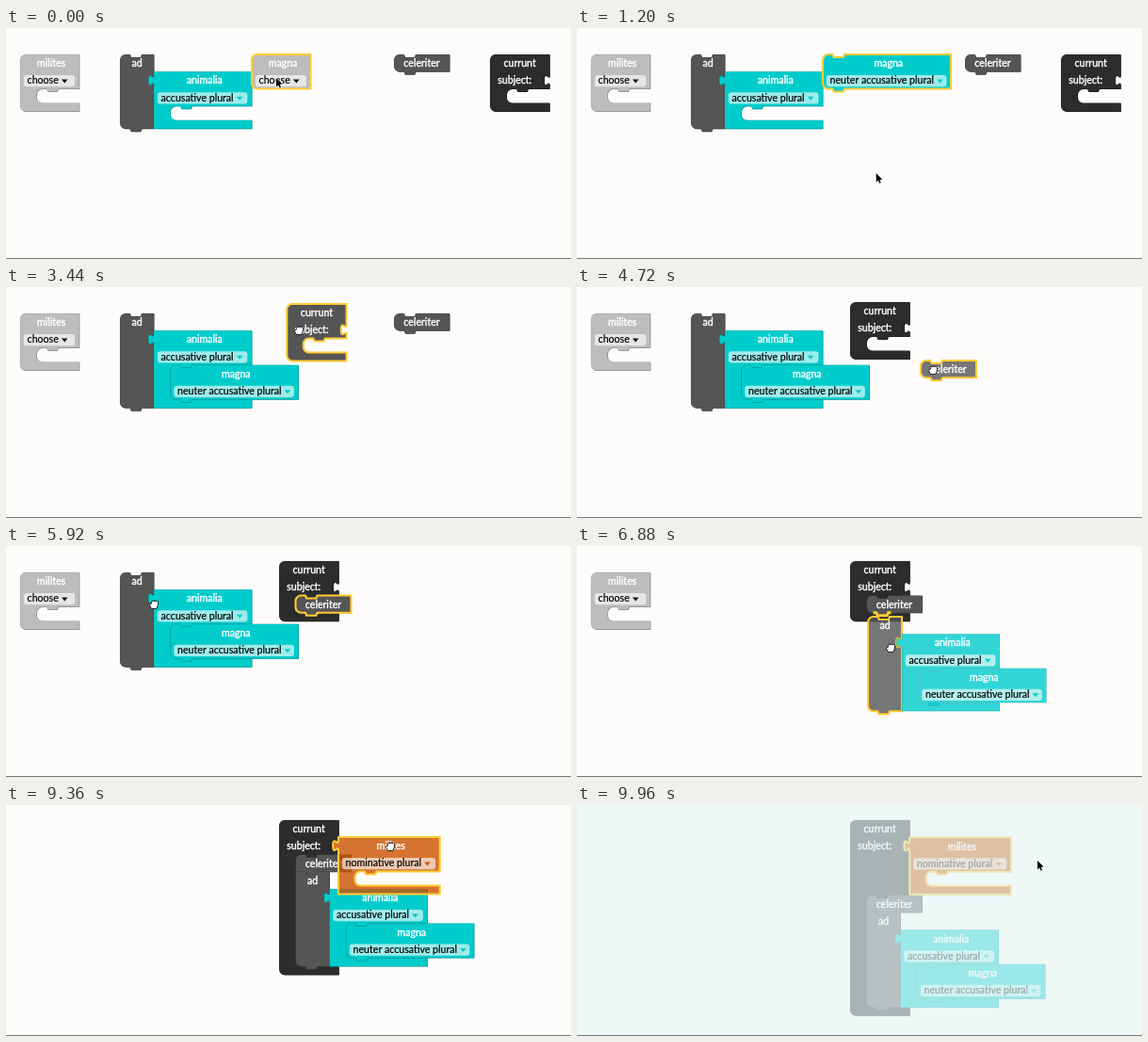
These frames come from a looping animation (600x245 px, 10 s). An HTML page with a canvas:

```html
<!DOCTYPE html>
<html lang="en">
<head>
<meta charset="utf-8">
<title>Latin sentence blocks</title>
<style>
html, body { margin: 0; width: 100%; height: 100%; overflow: hidden; background: #fdfcfa; }
canvas { display: block; }
</style>
</head>
<body>
<canvas id="stage" width="600" height="245"></canvas>
<script>
const ctx = document.getElementById('stage').getContext('2d');
const LOOP = 10000;
const ROW = 18.25, SLOT_Y = 36.5, SLOT_X = 17.5, BAR = 9, EMPTY = 15, CORNER = 5.8;
const NOTCH_START = 10.5, NOTCH_END = 23, NOTCH_DEPTH = 3;
const FONT = '10.6px Lato, sans-serif';
const YELLOW = '#fc3', TEAL = '#00cccc', GRAY = '#bdbdbd', SLATE = '#555555', INK = '#2c2c2c', ORANGE = '#cc5200';

// Moments at which blocks are grabbed, dropped or given a form.
const MAGNA = { open: 240, pick: 1180, grab: 1500, drop: 2110 };
const CURRUNT = { grab: 2720, drop: 3560 };
const CELERITER = { grab: 4300, drop: 5230 };
const AD = { grab: 5980, drop: 6960 };
const MILITES = { open: 7480, pick: 7990, grab: 8480, drop: 9400 };

// Pointer path: time, x, y.
const POINTER = [
  [0, 287, 53], [340, 287, 54], [950, 318, 156], [1180, 318, 156], [1460, 300, 38],
  [1500, 300, 38], [2060, 214, 93], [2110, 214, 93], [2320, 422.5, 82], [2400, 424, 81],
  [2680, 527, 56], [2720, 527, 56], [3140, 356, 90], [3440, 311, 46], [3560, 303, 44],
  [3720, 303, 44], [4160, 404, 42], [4290, 425, 38], [4320, 425, 38], [4720, 378, 88],
  [5150, 321, 63], [5320, 321, 63], [5780, 157, 62], [5920, 157, 62], [5975, 145, 61],
  [6000, 145, 61], [6240, 260, 109], [6500, 352, 113], [6860, 333, 108], [7010, 333, 108],
  [7280, 82, 66], [7440, 52, 55], [7560, 52, 55], [7830, 62, 91], [8000, 62, 91],
  [8180, 70, 65], [8240, 70, 65], [8450, 70, 38], [8500, 70, 38], [8900, 230, 78],
  [9340, 408, 44], [9430, 408, 44], [9720, 489, 59], [10000, 489, 59]
];

const during = (t, a, b) => t >= a && t < b;
const dragging = (t, span) => during(t, span.grab, span.drop);

function pointerAt(t) {
  let i = 1;
  while (i < POINTER.length - 1 && POINTER[i][0] < t) i++;
  const [t0, x0, y0] = POINTER[i - 1], [t1, x1, y1] = POINTER[i];
  const p = Math.max(0, Math.min(1, (t - t0) / (t1 - t0)));
  const e = p * p * (3 - 2 * p);
  return [x0 + (x1 - x0) * e, y0 + (y1 - y0) * e];
}

// Home before the grab, under the pointer while held, docked afterwards.
function place(t, span, home, dock, grip) {
  if (t < span.grab) return home;
  if (t >= span.drop) return dock;
  const [px, py] = pointerAt(t);
  return [px - grip[0], py - grip[1]];
}

function outline(x, y, b) {
  const { w, h } = b, r = CORNER;
  ctx.beginPath();
  if (b.tab || b.joinTop) ctx.moveTo(x, y);
  else ctx.arc(x + r, y + r, r, Math.PI, Math.PI * 1.5);
  if (b.prev) notch(x, y, 1);
  ctx.lineTo(x + w, y);
  if (b.socket) {
    ctx.lineTo(x + w, y + ROW + 3.7);
    tab(x + w, y + ROW + 9.15, 1);
  }
  if (b.slot) {
    const sx = x + SLOT_X, top = y + b.slotY, end = top + b.slot;
    ctx.lineTo(x + w, top);
    notch(sx, top, -1);
    ctx.arc(sx + r, top + r, r, -Math.PI / 2, Math.PI, true);
    ctx.arc(sx + r, end - r, r, Math.PI, Math.PI / 2, true);
    ctx.lineTo(x + w, end);
  }
  ctx.lineTo(x + w, y + h);
  if (b.next) notch(x, y + h, -1);
  if (b.tab || b.joinBottom) ctx.lineTo(x, y + h);
  else ctx.arc(x + r, y + h - r, r, Math.PI / 2, Math.PI);
  if (b.tab) {
    ctx.lineTo(x, y + 14.6);
    tab(x, y + 9.15, -1);
  }
  ctx.closePath();
}

// dir 1 runs left to right, -1 right to left.
function notch(x, y, dir) {
  const points = [[NOTCH_START, 0], [NOTCH_START + 1.2, NOTCH_DEPTH],
    [NOTCH_END - 1.2, NOTCH_DEPTH], [NOTCH_END, 0]];
  if (dir < 0) points.reverse();
  points.forEach(([dx, dy]) => ctx.lineTo(x + dx, y + dy));
}

// Puzzle knob centred on y; dir 1 runs downwards, -1 upwards.
function tab(x, y, dir) {
  const k = 5.8;
  ctx.bezierCurveTo(x, y + 1.8 * dir, x - k, y - 11.3 * dir, x - k, y);
  ctx.bezierCurveTo(x - k, y + 11.3 * dir, x, y - 1.8 * dir, x, y + 5.45 * dir);
}

function label(text, x, y, color = '#fff', align = 'left') {
  ctx.font = FONT;
  ctx.textAlign = align;
  ctx.fillStyle = ctx.strokeStyle = color;
  ctx.lineWidth = color === '#fff' ? 0.4 : 0.2;
  ctx.fillText(text, x, y);
  ctx.strokeText(text, x, y);
}

function block([x, y], b) {
  ctx.save();
  if (b.held) ctx.globalAlpha = 0.8;
  else {
    outline(x + 0.5, y + 0.5, b);
    ctx.fillStyle = b.color;
    ctx.fill();
    ctx.fillStyle = 'rgba(0,0,0,.2)';
    ctx.fill();
  }
  outline(x, y, b);
  ctx.fillStyle = b.color;
  ctx.fill();
  ctx.strokeStyle = 'rgba(0,0,0,.2)';
  ctx.lineWidth = 0.5;
  ctx.stroke();
  ctx.restore();
  if (b.selected) {
    ctx.strokeStyle = YELLOW;
    ctx.lineWidth = 2.1;
    ctx.stroke();
  }
  const shift = b.form ? 1.8 : 0;
  label(b.name, x + b.w / 2 + shift, y + 13.2, '#fff', 'center');
  if (b.note) label(b.note, x + 8.2, y + 31.3);
  if (b.form) dropdown(x + 3.8, y + 22, b);
}

function dropdown(x, y, b) {
  ctx.fillStyle = 'rgba(255,255,255,.62)';
  ctx.beginPath();
  ctx.roundRect(x, y, b.w - 8.4, 12.2, 3);
  ctx.fill();
  label(b.form, x + 3.8, y + 9.4, '#000');
  const ax = x + 3.8 + ctx.measureText(b.form).width + 3.2;
  ctx.fillStyle = b.color === GRAY ? '#111' : b.color;
  ctx.beginPath();
  ctx.moveTo(ax, y + 4.6);
  ctx.lineTo(ax + 6.6, y + 4.6);
  ctx.lineTo(ax + 3.3, y + 8.4);
  ctx.fill();
}

function menu(x, y, w, items, py) {
  const step = 16.6, h = items.length * step + 4;
  ctx.save();
  ctx.shadowColor = 'rgba(0,0,0,.25)';
  ctx.shadowBlur = 2;
  ctx.fillStyle = '#fff';
  ctx.fillRect(x, y, w, h);
  ctx.restore();
  ctx.strokeStyle = '#aaa';
  ctx.lineWidth = 0.8;
  ctx.strokeRect(x, y, w, h);
  items.forEach((item, i) => {
    const top = y + 2 + i * step;
    if (py >= top && py < top + step) {
      ctx.fillStyle = '#d6e9f8';
      ctx.fillRect(x + 0.5, top, w - 1, step);
    }
    ctx.font = '9.5px "Liberation Sans", Arial, sans-serif';
    ctx.fillStyle = '#000';
    ctx.textAlign = 'left';
    if (i === 0) ctx.fillText('✓', x + 7, top + 11.6);
    ctx.fillText(item, x + 20, top + 11.6);
  });
}

function ripple(t, start, x, y, limit) {
  const p = (t - start) / 310, r = 180 * p;
  if (p < 0 || r > limit) return;
  ctx.strokeStyle = `rgba(136,136,136,${1 - p})`;
  ctx.lineWidth = 7;
  ctx.beginPath();
  ctx.arc(x, y, r, 0, Math.PI * 2);
  ctx.stroke();
}

function arrow(x, y) {
  ctx.beginPath();
  [[0, 0], [0, 9.4], [2.2, 7.4], [3.5, 10.6], [5, 9.9], [3.7, 6.8], [6.6, 6.6]]
    .forEach(([dx, dy]) => ctx.lineTo(x + dx, y + dy));
  ctx.closePath();
  ctx.lineJoin = 'round';
  ctx.strokeStyle = '#fff';
  ctx.lineWidth = 1.4;
  ctx.stroke();
  ctx.fillStyle = '#000';
  ctx.fill();
}

function hand(x, y) {
  ctx.beginPath();
  ctx.moveTo(x - 2.5, y + 4.5);
  ctx.lineTo(x - 4.5, y + 0.8);
  ctx.quadraticCurveTo(x - 4.6, y - 1, x - 2.8, y - 0.6);
  for (let i = 0; i < 4; i++) {
    const fx = x - 3 + i * 1.9;
    ctx.quadraticCurveTo(fx + 0.9, y - 5.6 + (i === 3 ? 1 : 0), fx + 1.9, y - 3);
  }
  ctx.lineTo(x + 4.3, y + 1);
  ctx.lineTo(x + 2.8, y + 4.5);
  ctx.closePath();
  ctx.fillStyle = '#fff';
  ctx.fill();
  ctx.strokeStyle = '#111';
  ctx.lineWidth = 0.9;
  ctx.stroke();
}

function notchHint(x, y) {
  ctx.beginPath();
  ctx.moveTo(x + 7, y);
  notch(x, y, 1);
  ctx.lineTo(x + 26, y);
  ctx.strokeStyle = YELLOW;
  ctx.lineWidth = 2.9;
  ctx.stroke();
}

function draw(t) {
  const [px, py] = pointerAt(t);
  const full = t >= MAGNA.drop, whole = t >= MILITES.drop, stacked = t >= AD.drop;
  const magnaSet = t >= MAGNA.pick, militesSet = t >= MILITES.pick;
  const slotSize = full ? SLOT_Y : EMPTY;
  const nounHeight = SLOT_Y + slotSize + BAR;
  const adHeight = ROW + nounHeight;
  const verbSlotY = whole ? 79.8 : SLOT_Y;
  const stackX = 290 + SLOT_X, stackTop = 16 + verbSlotY;

  const currunt = place(t, CURRUNT, [514, 28], [290, 16], [12.7, 28]);
  const celeriter = place(t, CELERITER, [412, 28], [stackX, stackTop], [13, 10]);
  const ad = place(t, AD, [121, 28], [stackX, stackTop + ROW], [24, 33]);
  const animalia = [ad[0] + 36, ad[1] + ROW];
  const magnaDock = [animalia[0] + SLOT_X, animalia[1] + SLOT_Y];
  const magna = place(t, MAGNA, [261, 28], magnaDock, [39, 10]);
  const milites = place(t, MILITES, [15, 28], [353.3, 34.3], [55, 10]);

  let verbSlot = EMPTY;
  if (t >= CELERITER.drop) verbSlot = ROW;
  if (stacked) verbSlot += adHeight;

  ctx.fillStyle = '#fdfcfa';
  ctx.fillRect(0, 0, 600, 245);

  block(currunt, {
    name: 'currunt', note: 'subject:', color: INK, w: 63.3, h: verbSlotY + verbSlot + BAR,
    socket: true, slot: verbSlot, slotY: verbSlotY,
    held: dragging(t, CURRUNT), selected: during(t, CURRUNT.grab, CELERITER.grab)
  });
  block(celeriter, {
    name: 'celeriter', color: SLATE, w: 59, h: ROW, prev: true, next: true, joinBottom: stacked,
    held: dragging(t, CELERITER), selected: during(t, CELERITER.grab, AD.grab)
  });
  const adHeld = dragging(t, AD);
  block(ad, {
    name: 'ad', color: SLATE, w: 36, h: adHeight, prev: true, next: true, socket: true,
    joinTop: stacked, held: adHeld, selected: during(t, AD.grab, MILITES.open - 40)
  });
  if (during(t, 6640, AD.drop)) notchHint(stackX, stackTop + ROW);
  block(animalia, {
    name: 'animalia', form: 'accusative plural', color: TEAL, w: 104, h: nounHeight,
    tab: true, slot: slotSize, slotY: SLOT_Y, held: adHeld
  });
  block(magna, {
    name: 'magna', form: magnaSet ? 'neuter accusative plural' : 'choose',
    color: magnaSet ? TEAL : GRAY, w: magnaSet ? 136 : 62.5, h: SLOT_Y,
    prev: magnaSet, next: magnaSet, held: dragging(t, MAGNA) || adHeld,
    selected: t < CURRUNT.grab
  });
  if (during(t, 1940, MAGNA.drop)) notchHint(...magnaDock);
  block(milites, {
    name: 'milites', form: militesSet ? 'nominative plural' : 'choose',
    color: militesSet ? ORANGE : GRAY, w: militesSet ? 107.7 : 62.8, h: SLOT_Y + EMPTY + BAR,
    tab: militesSet, slot: EMPTY, slotY: SLOT_Y,
    held: dragging(t, MILITES), selected: t >= MILITES.open - 40
  });

  if (during(t, MAGNA.open, MAGNA.pick)) {
    menu(265, 64.5, 185, ['choose', 'feminine nominative singular', 'feminine vocative singular',
      'feminine ablative singular', 'neuter nominative plural', 'neuter accusative plural'], py);
  }
  if (during(t, MILITES.open, MILITES.pick)) {
    menu(19, 64.5, 150, ['choose', 'nominative plural', 'accusative plural', 'vocative plural'], py);
  }

  ripple(t, 2120, 191, 85.5, 118);
  ripple(t, CELERITER.drop, 324, 55, 94);
  ripple(t, AD.drop, 324, 74, 58);
  ripple(t, MILITES.drop, 351, 44, 118);

  const veil = Math.max(0, (t - 9560) / 400) * 0.67;
  ctx.fillStyle = `rgba(231,246,247,${Math.min(1, veil)})`;
  ctx.fillRect(0, 0, 600, 245);

  ctx.fillStyle = '#777';
  ctx.fillRect(0, 244, 600, 1);

  const grabbing = [MAGNA, CURRUNT, CELERITER, AD, MILITES].some(span => dragging(t, span));
  const hovering = during(t, 5700, AD.grab) || during(t, CELERITER.drop, 5340);
  (grabbing || hovering ? hand : arrow)(px, py);
}

const start = performance.now();
function tick() {
  draw((performance.now() - start) % LOOP);
  requestAnimationFrame(tick);
}
draw(0);
requestAnimationFrame(tick);
</script>
</body>
</html>
```
